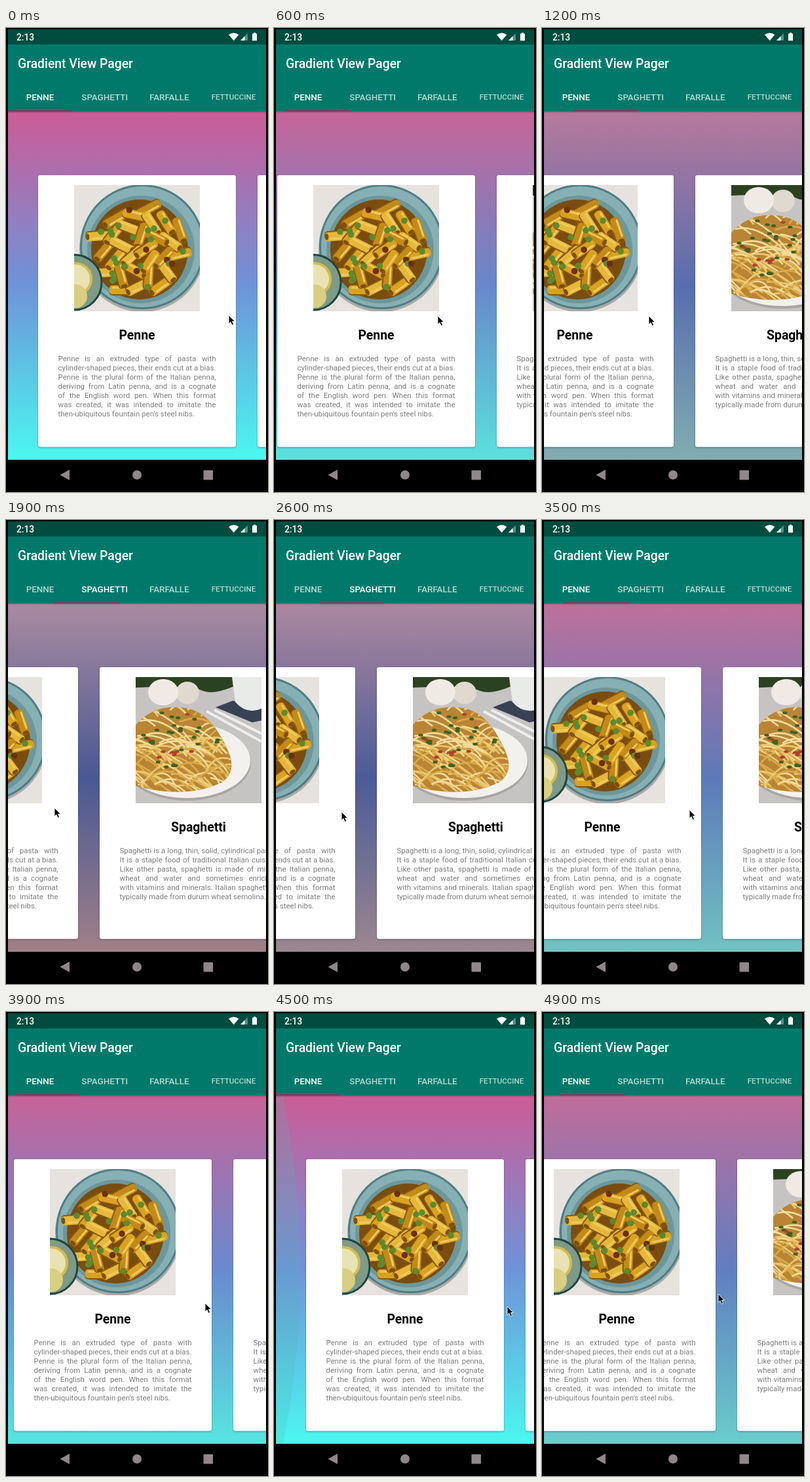
An HTML page that plays this animation: 400x706 px, repeating every 5 s.

```html
<!DOCTYPE html>
<html lang="en">
<head>
<meta charset="utf-8">
<title>Gradient View Pager</title>
<style>
html, body { margin: 0; width: 100%; height: 100%; overflow: hidden; background: #000; }
svg { display: block; width: 100vw; height: 100vh; }
text { font-family: Roboto, sans-serif; }
.medium { font-weight: 500; fill: #fff; }
.tab { font-weight: 500; font-size: 13.4px; text-anchor: middle; fill: #fff; }
.name { font-weight: 700; font-size: 19.4px; text-anchor: middle; }
.body { font-size: 11.5px; fill: #7c7c7c; }
.sheet { filter: drop-shadow(0 1.2px 1px rgba(0, 0, 0, .35)); }
</style>
</head>
<body>
<svg id="stage" viewBox="0 0 400 706" preserveAspectRatio="none">
  <defs>
    <linearGradient id="sky" x1="0" y1="0" x2="0" y2="1">
      <stop offset="0"/><stop offset=".5"/><stop offset="1"/>
    </linearGradient>
    <linearGradient id="fall" x1="0" y1="0" x2="0" y2="1">
      <stop offset="0" stop-opacity=".22"/><stop offset="1" stop-opacity="0"/>
    </linearGradient>
    <clipPath id="view"><rect x="3" y="127" width="394" height="530"/></clipPath>
    <clipPath id="photo"><rect width="192" height="192"/></clipPath>
    <clipPath id="mound"><path id="moundShape" d="M-4 78C12 56 36 44 64 46C98 46 118 68 132 94C148 122 154 144 132 160C92 180 40 178 -4 164Z"/></clipPath>
  </defs>
  <rect width="400" height="706"/>
  <g clip-path="url(#view)">
    <rect x="3" y="127" width="394" height="530" fill="url(#sky)"/>
    <g id="pages"></g>
    <path id="glow" d="M3 127H14Q66 392 14 657H3Z" fill="#4db6ac"/>
  </g>
  <rect x="3" y="127" width="394" height="3" fill="url(#fall)"/>
  <rect x="3" y="2" width="394" height="23" fill="#004d40"/>
  <rect x="3" y="25" width="394" height="102" fill="#00796b"/>
  <text class="medium" x="16" y="19" font-size="13.8">2:13</text>
  <g fill="#fff">
    <path d="M340 10.200Q347.700 5 355.400 10.200L347.700 19.200Z"/>
    <path d="M369 8V19H358Z" opacity=".35"/>
    <path d="M364.500 12.500V19H358Z"/>
    <path d="M378 7h3v1.400h2v10.800h-7V8.400h2z"/>
  </g>
  <text class="medium" x="18" y="61" font-size="19.3">Gradient View Pager</text>
  <g id="tabs"></g>
  <rect id="bar" x="3" y="125.500" width="98.500" height="1.800" fill="#c2185b"/>
  <g fill="#8f8789">
    <path d="M82.500 680L97 672V688Z"/>
    <circle cx="200" cy="680" r="7"/>
    <rect x="301.500" y="673" width="14.500" height="14.500" rx="1"/>
  </g>
  <path id="cursor" d="M0 0V13L3 10.300L5.200 15.300L7.600 14.300L5.400 9.500H9.300Z" stroke="#fff" stroke-width=".9"/>
</svg>
<script>
const LOOP = 5000, STEP = 100, PITCH = 335, TAB = 98.5;
const $ = id => document.getElementById(id);

function add(parent, tag, attrs, text) {
  const node = document.createElementNS('http://www.w3.org/2000/svg', tag);
  for (const key in attrs) node.setAttribute(key, attrs[key]);
  if (text) node.textContent = text;
  parent.appendChild(node);
  return node;
}

function seeded(seed) {
  return () => (seed = (seed * 16807) % 2147483647) / 2147483647;
}

// Smooth curve through [time, value] points without overshoot
function track(points) {
  const slope = points.slice(1).map((p, i) => (p[1] - points[i][1]) / (p[0] - points[i][0]));
  const tangent = points.map((p, i) => {
    const a = slope[i - 1] ?? slope[i], b = slope[i] ?? a;
    return a * b > 0 ? 2 * a * b / (a + b) : 0;
  });
  return t => {
    let i = 0;
    while (i < points.length - 2 && t >= points[i + 1][0]) i++;
    const [t0, v0] = points[i], [t1, v1] = points[i + 1], h = t1 - t0;
    const u = Math.min(1, (t - t0) / h), w = 1 - u;
    return v0 * (1 + 2 * u) * w * w + tangent[i] * h * u * w * w
      + v1 * u * u * (3 - 2 * u) - tangent[i + 1] * h * u * u * w;
  };
}

function drawPenne(g) {
  const rnd = seeded(41), golden = 2.39996;
  const spot = (i, n, r) => {
    const d = r * Math.sqrt((i + .5) / n), a = i * golden;
    return [100 + d * Math.cos(a), 97 + d * Math.sin(a)];
  };
  add(g, 'rect', { width: 192, height: 192, fill: '#e6e3df' });
  add(g, 'circle', { cx: 104, cy: 97, r: 96, fill: '#a9aaa6' });
  add(g, 'circle', { cx: 104, cy: 94, r: 95, fill: '#4f7d84' });
  add(g, 'circle', { cx: 104, cy: 94, r: 92, fill: '#86b0b3' });
  add(g, 'circle', { cx: 102, cy: 98, r: 82, fill: '#6c979b' });
  add(g, 'ellipse', { cx: 100, cy: 98, rx: 74, ry: 76, fill: '#7a4d0e' });
  const colors = ['#d9a21f', '#e6b83a', '#c28a18'];
  for (let i = 27; i >= 0; i--) {
    const [x, y] = spot(i, 28, 69);
    const tube = add(g, 'g', { transform: `translate(${x} ${y}) rotate(${rnd() * 180})` });
    add(tube, 'rect', { x: -20, y: -6, width: 40, height: 14, rx: 5, fill: '#8a570f' });
    add(tube, 'rect', { x: -20, y: -7.5, width: 40, height: 13.5, rx: 5, fill: colors[i % 3] });
    add(tube, 'rect', { x: -16, y: -5.5, width: 28, height: 3, rx: 1.5, fill: '#efca5c' });
    add(tube, 'ellipse', { cx: 17, cy: -.7, rx: 3, ry: 5, fill: '#7f4f0c' });
  }
  for (let i = 0; i < 24; i++) {
    const [x, y] = spot(i + rnd(), 24, 66);
    add(g, 'circle', { cx: x, cy: y, r: 4.8, fill: i % 5 ? '#5d8a2e' : '#6d2f12' });
  }
  add(g, 'circle', { cx: 0, cy: 148, r: 42, fill: '#7f9a88', stroke: '#1f463f', 'stroke-width': 3 });
  add(g, 'circle', { cx: 2, cy: 143, r: 24, fill: '#e9e3b4', stroke: '#d3bd4d', 'stroke-width': 4 });
  add(g, 'circle', { cx: 2, cy: 169, r: 18, fill: '#d9cf82' });
}

function drawSpaghetti(g) {
  const rnd = seeded(77);
  add(g, 'rect', { width: 192, height: 192, fill: '#c6c4c2' });
  add(g, 'path', { d: 'M0 0H150V14Q118 28 100 20T0 16Z', fill: '#2b4220' });
  add(g, 'path', { d: 'M122 46L148 36L192 44V66L178 69Z', fill: '#394155' });
  add(g, 'path', { d: 'M147 0H192V48Q170 58 152 38Z', fill: '#e9ebe8' });
  add(g, 'ellipse', { cx: 79, cy: 24, rx: 18, ry: 17, fill: '#dfd9cf' });
  add(g, 'ellipse', { cx: 42, cy: 23, rx: 23, ry: 20, fill: '#efebe4' });
  add(g, 'path', { d: 'M108 52L192 98M120 50L192 86', stroke: '#eeeeee', 'stroke-width': 4 });
  add(g, 'ellipse', { cx: 78, cy: 130, rx: 98, ry: 58, fill: '#a9a6a3' });
  add(g, 'ellipse', { cx: 78, cy: 127, rx: 97, ry: 57, fill: '#f3f1ee' });
  add(g, 'path', { d: $('moundShape').getAttribute('d'), fill: '#b98534' });
  const heap = add(g, 'g', { 'clip-path': 'url(#mound)', fill: 'none', 'stroke-width': 2.6 });
  const colors = ['#ebc971', '#d9ab4a', '#f3dc9b'];
  for (let i = 0; i < 90; i++) {
    const x = rnd() * 170 - 45, y = 40 + rnd() * 130, bend = rnd() * 80 - 40;
    add(heap, 'path', {
      d: `M${x} ${y}q${20 + rnd() * 25} ${bend - 15} ${50 + rnd() * 30} ${bend + 22}`,
      stroke: colors[i % 3]
    });
  }
  for (let i = 0; i < 36; i++) {
    const a = rnd() * 6.283, d = Math.sqrt(rnd());
    add(heap, 'ellipse', {
      cx: 68 + 58 * d * Math.cos(a), cy: 94 + 46 * d * Math.sin(a),
      rx: 3.6, ry: 2.2, fill: i % 4 ? '#3d6224' : '#b0402a', stroke: 'none'
    });
  }
}

const cards = [
  ['Penne', drawPenne, [
    'Penne is an extruded type of pasta with',
    'cylinder-shaped pieces, their ends cut at a bias.',
    'Penne is the plural form of the Italian penna,',
    'deriving from Latin penna, and is a cognate',
    'of the English word pen. When this format',
    'was created, it was intended to imitate the',
    "then-ubiquitous fountain pen's steel nibs."]],
  ['Spaghetti', drawSpaghetti, [
    'Spaghetti is a long, thin, solid, cylindrical pasta.',
    'It is a staple food of traditional Italian cuisine.',
    'Like other pasta, spaghetti is made of milled',
    'wheat and water and sometimes enriched',
    'with vitamins and minerals. Italian spaghetti is',
    'typically made from durum wheat semolina.']]
];

cards.forEach(([name, draw, lines], page) => {
  const card = add($('pages'), 'g', { transform: `translate(${page * PITCH} 0)` });
  add(card, 'rect', { class: 'sheet', x: 49, y: 224, width: 302, height: 413.5, rx: 3, fill: '#fff' });
  const frame = add(card, 'g', { transform: 'translate(104 239)' });
  draw(add(frame, 'g', { 'clip-path': 'url(#photo)' }));
  add(card, 'text', { class: 'name', x: 200, y: 474 }, name);
  lines.forEach((line, i) => {
    const text = add(card, 'text', { class: 'body', x: 79.5, y: 507.3 + i * 13.87 }, line);
    if (i === lines.length - 1) return;
    // Justify by sharing the spare room between the spaces
    const spare = 241 - text.getComputedTextLength();
    text.style.wordSpacing = spare / (line.split(' ').length - 1) + 'px';
  });
});

const tabs = [['PENNE', 52], ['SPAGHETTI', 150.7], ['FARFALLE', 249.3], ['FETTUCCINE', 347.5]].map(([label, x], i) => {
  const tab = add($('tabs'), 'text', { class: 'tab', x, y: i === 3 ? 109 : 110 }, label);
  if (i === 3) tab.style.fontSize = '11.5px';
  return tab;
});

const shift = track([[0, 0], [150, 0], [1200, 150], [1900, 241], [2200, 264], [2600, 227],
  [3500, 108], [4250, 0], [4500, 0], [4900, 86]]);
const pointerX = track([[0, 340], [1200, 163], [1900, 74], [2150, 50], [2600, 103],
  [3500, 225], [4350, 363], [4500, 356], [4900, 269]]);
const pointerY = track([[0, 437], [1200, 438], [1900, 438], [2150, 441], [2600, 444],
  [3500, 441], [4350, 447], [4500, 448], [4900, 429]]);
const glow = track([[0, 0], [4200, 0], [4400, .25], [4500, .2], [4700, 0], [5000, 0]]);

// Top, middle and bottom colours of the first and second page
const shades = [
  [[204, 92, 150], [157, 157, 164]],
  [[110, 147, 217], [58, 65, 121]],
  [[75, 247, 240], [193, 82, 96]]
];
const stops = document.querySelectorAll('#sky stop');

function render(time) {
  const t = Math.floor(time % LOOP / STEP) * STEP;
  const x = Math.round(shift(t)), p = x / PITCH;
  $('pages').setAttribute('transform', `translate(${-x} 0)`);
  $('bar').setAttribute('x', 3 + p * TAB);
  $('glow').setAttribute('opacity', glow(t));
  $('cursor').setAttribute('transform', `translate(${Math.round(pointerX(t))} ${Math.round(pointerY(t))})`);
  tabs.forEach((tab, i) => tab.setAttribute('fill-opacity', i === Math.round(p) ? 1 : .7));
  shades.forEach(([a, b], i) => {
    const mix = a.map((v, k) => Math.round(v + (b[k] - v) * p));
    stops[i].setAttribute('stop-color', `rgb(${mix})`);
  });
}

let start;
function tick(now) {
  start ??= now;
  render(now - start);
  requestAnimationFrame(tick);
}
render(0);
requestAnimationFrame(tick);
</script>
</body>
</html>
```
